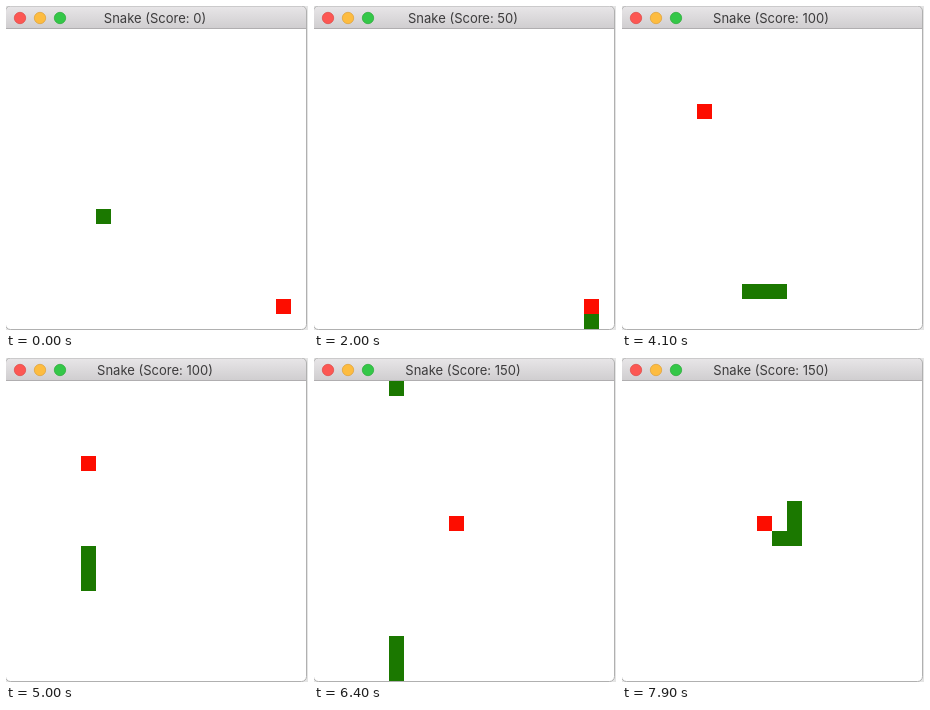
These frames come from a looping animation (302 px wide and 324 px high, 8 s). An HTML page with a canvas:

```html
<!DOCTYPE html>
<html lang="en">
<head>
<meta charset="utf-8">
<title>Snake</title>
<style>
html, body { margin: 0; width: 100%; height: 100%; overflow: hidden; background: #fff; }
canvas { display: block; }
</style>
</head>
<body>
<canvas id="stage" width="302" height="324"></canvas>
<script>
const ctx = document.getElementById('stage').getContext('2d');
const CELL = 15, GRID = 20, TOP = 23, STEP = 100, LOOP = 8000;
const DIRS = { R: [1, 0], L: [-1, 0], U: [0, -1], D: [0, 1] };
const ROUTE = 'R7 D7 R5 U7 L5 D5 L8 U27 R6 U2';
const FOODS = [[18, 18], [13, 13], [5, 5], [9, 9]];
const wrap = n => (n + GRID) % GRID;

// Play the whole game once; each state is one tick.
function play() {
  let body = [[6, 12]], score = 0, food = 0;
  const states = [{ body, score, food }];
  for (const leg of ROUTE.split(' ')) {
    const [dx, dy] = DIRS[leg[0]];
    for (let i = 0; i < +leg.slice(1); i++) {
      food = score / 50;
      const head = [wrap(body[0][0] + dx), wrap(body[0][1] + dy)];
      const ate = head.join() === FOODS[food].join();
      body = [head, ...(ate ? body : body.slice(0, -1))];
      if (ate) score += 50;
      // Eaten food stays visible until the next tick.
      states.push({ body, score, food });
    }
  }
  return states;
}
const states = play();

function cell([x, y], color) {
  ctx.fillStyle = color;
  ctx.fillRect(x * CELL, TOP + y * CELL, CELL, CELL);
}

function light(x, fill, edge) {
  ctx.beginPath();
  ctx.arc(x, 12, 5.7, 0, Math.PI * 2);
  ctx.fillStyle = fill;
  ctx.fill();
  ctx.strokeStyle = edge;
  ctx.lineWidth = 0.7;
  ctx.stroke();
}

function drawWindow(score) {
  ctx.fillStyle = '#e4e4e4';
  ctx.fillRect(0, 0, 302, 324);
  ctx.beginPath();
  ctx.roundRect(-0.5, 0, 301, 323.5, 5);
  ctx.fillStyle = '#fff';
  ctx.fill();

  ctx.save();
  ctx.clip();
  const bar = ctx.createLinearGradient(0, 0, 0, 22);
  bar.addColorStop(0, '#e8e6e8');
  bar.addColorStop(1, '#d0ced0');
  ctx.fillStyle = bar;
  ctx.fillRect(0, 0, 302, 22);
  ctx.fillStyle = '#b0aeb0';
  ctx.fillRect(0, 22, 302, 1);
  ctx.restore();

  ctx.strokeStyle = '#b0b0b0';
  ctx.lineWidth = 1;
  ctx.stroke();

  light(14, '#fc5753', '#df4744');
  light(34, '#fdbc40', '#de9f34');
  light(54, '#34c748', '#27aa35');

  ctx.fillStyle = '#3c3b3c';
  ctx.font = '13px Inter, Roboto, sans-serif';
  ctx.textAlign = 'center';
  ctx.fillText(`Snake (Score: ${score})`, 149, 17);
}

function draw(now) {
  const { body, score, food } = states[Math.floor((now % LOOP) / STEP)];
  drawWindow(score);
  for (const part of body) cell(part, '#1b7800');
  cell(FOODS[food], '#fd0d00');
  requestAnimationFrame(() => draw(performance.now()-start));
}

const start = performance.now();
draw(0);
</script>
</body>
</html>
```
